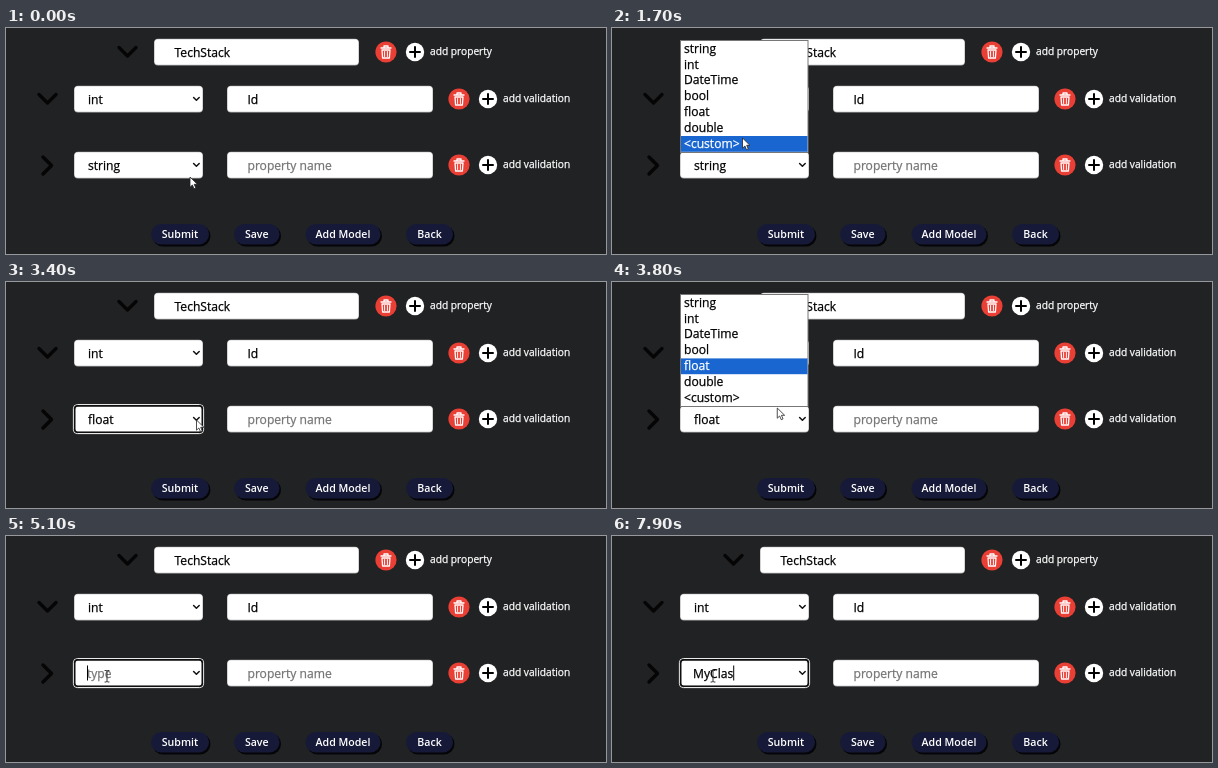
Write an HTML page that moves like this. It is 600 by 226 pixels and loops after 8 s.

```html
<!DOCTYPE html>
<html lang="en">
<head>
<meta charset="utf-8">
<title>Model form</title>
<style>
  html, body { margin: 0; width: 100%; height: 100%; overflow: hidden; background: #212224; }
  svg { display: block; width: 100%; height: 100%; }
  text {
    font: 12.1px "Trebuchet MS", "Open Sans", sans-serif; white-space: pre;
    color: #000; fill: currentColor; stroke: currentColor; stroke-width: .25;
  }
  .label { font-size: 10.2px; color: #fff; }
  .button { font-size: 10.6px; font-weight: 600; color: #fff; stroke: none; text-anchor: middle; }
  .hint { color: #757575; }
  .line { fill: none; stroke-linecap: round; stroke-linejoin: round; }
</style>
</head>
<body>
<svg id="stage" viewBox="0 0 600 226"></svg>
<script>
const LOOP = 8000, STEP = 100;
const TYPES = ["string", "int", "DateTime", "bool", "float", "double", "<custom>"];
const ROW = 15.8, LIST_TOP = 13.2;
const stage = document.getElementById("stage");

function add(tag, attrs, parent = stage) {
  const node = document.createElementNS("http://www.w3.org/2000/svg", tag);
  for (const key in attrs) node.setAttribute(key, attrs[key]);
  return parent.appendChild(node);
}
function text(x, y, value, cls = "", parent = stage) {
  const node = add("text", { x, y, class: cls }, parent);
  node.textContent = value;
  return node;
}
const line = (d, stroke, width, parent) =>
  add("path", { d, stroke, "stroke-width": width, class: "line" }, parent);
const box = (x, y, width, height, rx, fill, parent) =>
  add("rect", { x, y, width, height, rx, fill }, parent);
const show = (node, on) => node.setAttribute("visibility", on ? "visible" : "hidden");

function field(x, y, w, value, cls) {
  box(x, y - .3, w, 26.8, 4, "#a9a9ab");
  box(x + .5, y + .3, w - 1, 25.4, 3.5, "#fff");
  return text(x + (w > 150 ? 20.5 : 14), y + 17.6, value, cls);
}
const selectArrow = y => line(`M187.6 ${y - 1.5}l2.8 2.8 2.8-2.8`, "#111", 1.5);

function actions(x, y, label) {
  add("circle", { cx: x, cy: y, r: 10.6, fill: "#ea3f35" });
  line(`M${x - 5} ${y - 4}h10M${x - 2} ${y - 4}v-2h4v2M${x - 4} ${y - 2}l.6 8h6.8l.6-8z`, "#fff", 1.3);
  line(`M${x - 1.4} ${y - .5}v5M${x + 1.4} ${y - .5}v5`, "#fff", 1);
  add("circle", { cx: x + 29, cy: y, r: 9.2, fill: "#fff" });
  line(`M${x + 24} ${y}h10M${x + 29} ${y - 5}v10`, "#000", 2);
  text(x + 44, y + 3.3, label, "label");
}
function button(x, w, label) {
  box(x + 1.5, 197.5, w, 21, 10.5, "#050508");
  box(x, 196, w, 20.5, 10.2, "#161a38");
  text(x + w / 2, 210.4, label, "button");
}

// Form
line("M113 19.5l8.5 8.5 8.5-8.5", "#050505", 3.4);
line("M33 66.5l8.5 8.5 8.5-8.5", "#050505", 3.4);
line("M37 129l8.5 8.5-8.5 8.5", "#050505", 3.4);
field(148, 11, 205, "TechStack");
field(68, 58, 129, "int");
selectArrow(71);
field(221, 58, 206, "Id");
const value = field(68, 124, 129, "string");
field(221, 124, 206, "property name", "hint");
actions(380, 24, "add property");
actions(453, 71, "add validation");
actions(453, 137, "add validation");
button(145, 58, "Submit");
button(228, 45.5, "Save");
button(299.5, 75, "Add Model");
button(400, 47, "Back");

// Focus ring
const ring = add("g", { fill: "none" });
add("rect", { x: 67.4, y: 122.6, width: 130.2, height: 29, rx: 4, stroke: "#fff" }, ring);
add("rect", { x: 68.7, y: 123.9, width: 127.6, height: 26.4, rx: 3, stroke: "#101010", "stroke-width": 1.6 }, ring);
selectArrow(137);
const caret = box(81, 129.5, 1, 15, 0, "#000");

// Open list
const list = add("g", {});
add("rect", { x: 68.5, y: 12.5, width: 127.5, height: 112, fill: "#fff", stroke: "#777" }, list);
const bar = box(69, 0, 126.5, ROW, 0, "#1a66d0", list);
const options = TYPES.map((type, i) => text(72, LIST_TOP + i * ROW + 11.5, type, "", list));

// Pointers
const arrow = add("path", {
  d: "M0 0V10.2L2.4 8 4 11.7 5.8 10.9 4.2 7.3H7.4Z",
  fill: "#fff", stroke: "#222", "stroke-width": .8
});
const beam = line("M-2-5.5h1.4l.6.6.6-.6h1.4M0-5v10.5M-2 6h1.4l.6-.6.6.6h1.4", "#333", 1);

// [time, x, y]
const path = [
  [0, 184, 149], [200, 187, 136], [400, 186, 134], [800, 150, 104], [1200, 133, 108],
  [1400, 133, 108], [1700, 130.5, 110], [2200, 122, 87], [2400, 121, 93], [2700, 138, 106],
  [3100, 186, 136], [3200, 186, 136], [3400, 190.5, 138], [3600, 190.5, 138], [4000, 140, 114],
  [4300, 110, 117], [4700, 110, 117], [5100, 101, 140], [LOOP, 101, 140]
];
function pointerAt(t) {
  const i = path.findIndex(p => p[0] > t);
  const [t0, x0, y0] = path[i - 1], [t1, x1, y1] = path[i];
  const k = (t - t0) / (t1 - t0);
  return [x0 + (x1 - x0) * k, y0 + (y1 - y0) * k];
}

const keys = [7100, 7300, 7400, 7600, 7700, 7900];
function draw(t) {
  const [x, y] = pointerAt(t);
  const open = (t >= 400 && t < 2400) || (t >= 3700 && t < 4700);
  const editing = t >= 4700;
  const chosen = t < 2400 ? "string" : "float";
  const typed = "MyClas".slice(0, keys.filter(k => k <= t).length);

  value.textContent = editing ? typed || "type" : chosen;
  value.setAttribute("class", editing && !typed ? "hint" : "");
  value.setAttribute("x", editing ? 81 : 82);

  show(ring, t >= 2400 && !open);
  const blink = t < 5500 || (t >= 6000 && t < 6600);
  show(caret, editing && (typed || blink));
  caret.setAttribute("x", typed ? 81 + value.getComputedTextLength() : 81);

  show(list, open);
  const inside = y < LIST_TOP + ROW * TYPES.length;
  const hover = inside ? Math.floor((y - LIST_TOP) / ROW) : TYPES.indexOf(chosen);
  bar.setAttribute("y", LIST_TOP + hover * ROW);
  options.forEach((o, i) => o.style.color = i === hover ? "#fff" : "#000");

  const overText = editing && y > 124;
  show(arrow, !overText);
  show(beam, overText);
  (overText ? beam : arrow).setAttribute("transform", `translate(${x} ${y})`);
}

const start = performance.now();
function tick() {
  const t = (performance.now() - start) % LOOP;
  draw(Math.floor(t / STEP) * STEP);
  requestAnimationFrame(tick);
}
tick();
</script>
</body>
</html>
```
